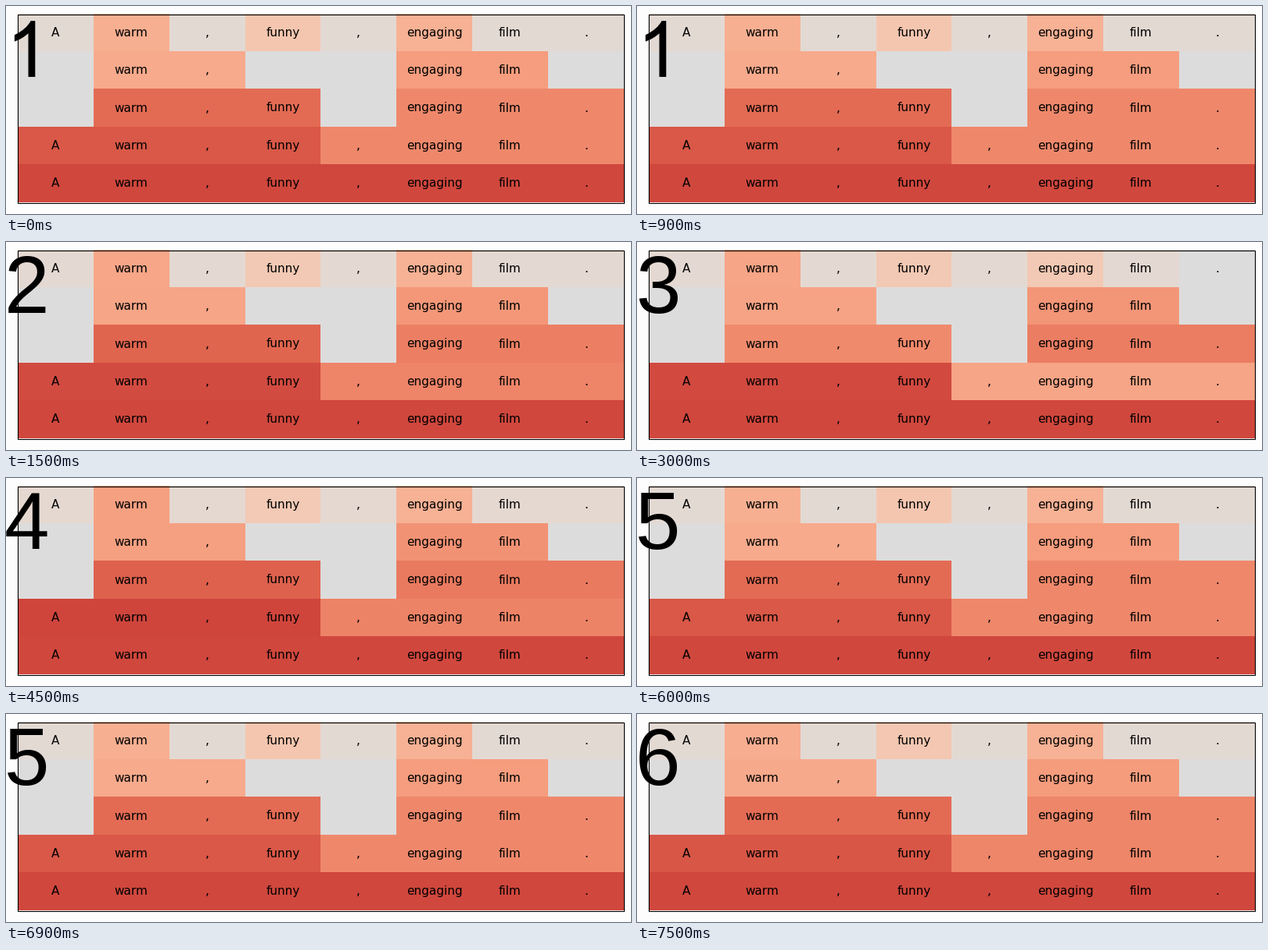
Recreate the animation shown at these times as a matplotlib script. Size 799 by 267 pixels, loop 8000 ms.

```python
import numpy as np
import matplotlib.pyplot as plt
from matplotlib.animation import FuncAnimation
from matplotlib.patches import PathPatch, Rectangle
from matplotlib.path import Path

W, H, DPI = 799, 267, 100
TICK_MS, TICKS_PER_STEP = 500, 3
BASELINE = 91
LEFT, TOP, RIGHT, BOTTOM = 15, 10, 790, 252

WORDS = "A warm , funny , engaging film .".split()

# Each cell names its phrase by a hex digit; 0 is empty.
PHRASES = ["12131415", "06600770", "08880999", "aaaabbbb", "cccccccc"]
CELLS = np.array([[int(c, 16) for c in row] for row in PHRASES])

# Resting score of each phrase, and how far it moves at full drift
BASE = np.array([.5, .524, .692, .618, .687, .524, .705, .742, .852, .792,
                 .889, .792, .921])
SWING = np.array([0, .8, 4, -1.5, 0, .8, 2.8, 2.4, 2, 3, 3.6, 1, 0]) / 100
DRIFT = [0, .6, .7, 1, 0, .1]

# One step scores these phrases lower, never below neutral.
DIP_STEP, DIP = 2, .08
DIPPED = np.isin(np.arange(len(BASE)), [4, 5, 8, 11])


def scores_at(step):
    scores = BASE + DRIFT[step] * SWING
    if step == DIP_STEP:
        scores = np.maximum(.5, scores - DIP * DIPPED)
    return scores[CELLS]


fig = plt.figure(figsize=(W / DPI, H / DPI), dpi=DPI, facecolor="#fdfdfd")
ax = fig.add_axes([0, 0, 1, 1])

xs = np.linspace(LEFT, RIGHT, len(WORDS) + 1)
ys = np.linspace(TOP, BOTTOM, len(PHRASES) + 1)
mesh = ax.pcolormesh(np.round(xs), np.floor(ys), scores_at(0),
                     cmap="coolwarm", vmin=0, vmax=1)
# Slightly off the pixel edge so that each side snaps to its own pixel
ax.add_patch(Rectangle((LEFT + .2, TOP + .8), RIGHT - LEFT, BOTTOM - TOP,
                       fill=False, ec="black", lw=.8, joinstyle="miter",
                       zorder=3))
ax.set_xlim(0, W)
ax.set_ylim(H, 0)
ax.axis("off")

mid_x = (xs[:-1] + xs[1:]) / 2 - .2
mid_y = (ys[:-1] + ys[1:]) / 2
for row, y in zip(CELLS, mid_y):
    for phrase, word, x in zip(row, WORDS, mid_x):
        if phrase:
            ax.text(x, y, word, family="DejaVu Sans", size=11,
                    ha="center", va="center")

counter = ax.text(-2, BASELINE, "", family="Liberation Sans", size=74.4,
                  ha="left", va="baseline", zorder=4)

# The digit one has no foot, so it is built from its outline.
one = np.array([(37.3, 0), (28.5, 0), (28.5, 56), (22, 49.5), (10.9, 45.4),
                (10.9, 53.9), (26, 61), (31.6, 71.9), (37.3, 71.9),
                (37.3, 0)])
L, Q = Path.LINETO, Path.CURVE3
codes = [Path.MOVETO, L, L, Q, Q, L, Q, Q, L, Path.CLOSEPOLY]
digit_one = PathPatch(Path(one * (1, -1) + (0, BASELINE), codes),
                      fc="black", lw=0, zorder=4)
ax.add_patch(digit_one)


def draw(tick):
    step = tick // TICKS_PER_STEP
    mesh.set_array(scores_at(step))
    digit_one.set_visible(step == 0)
    counter.set_text(str(step + 1) if step else "")
    return mesh, digit_one, counter


anim = FuncAnimation(fig, draw, frames=16, interval=TICK_MS,
                     init_func=lambda: draw(0), repeat=True, repeat_delay=0)
plt.show()
```
